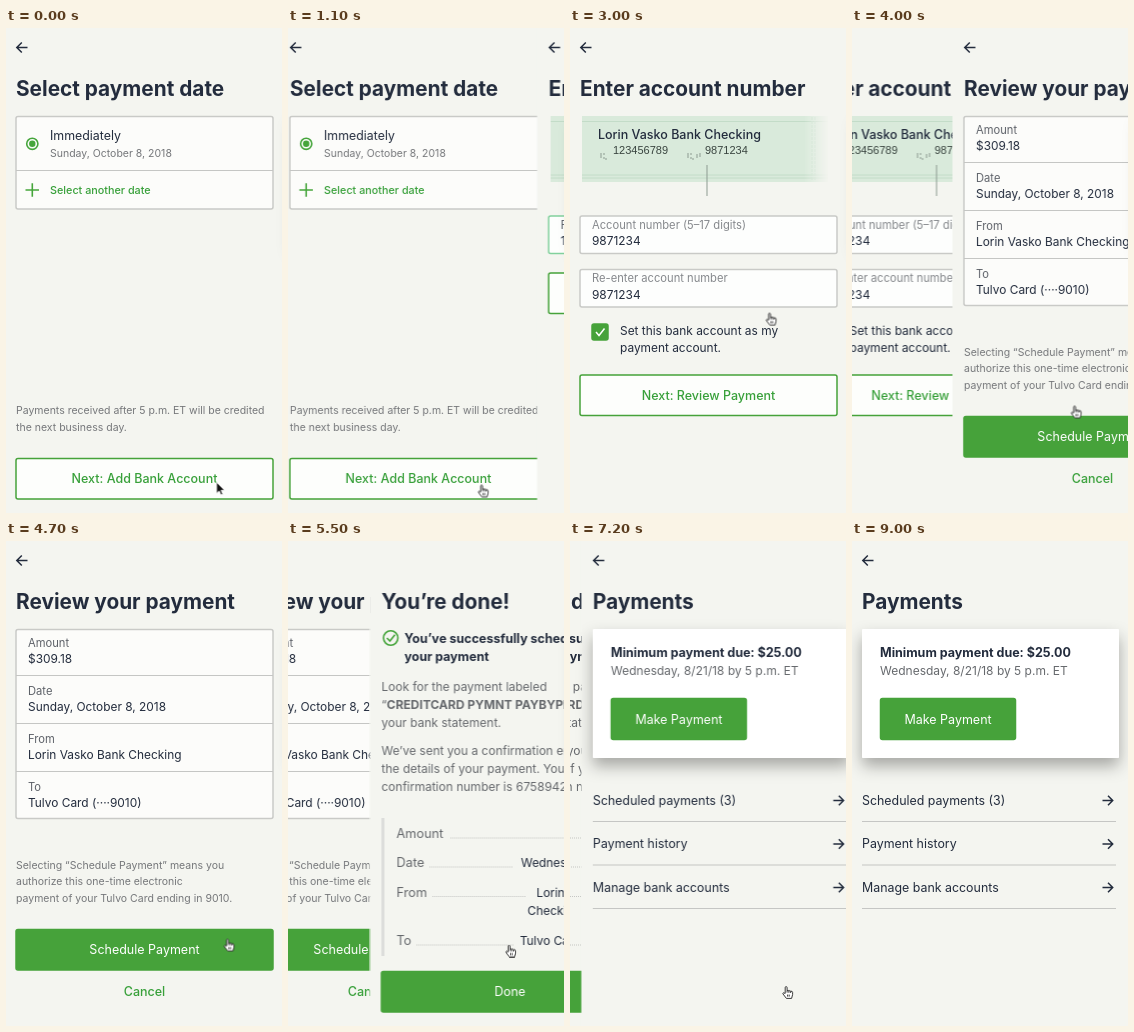
Animation, 276 px wide and 485 px high, one loop 9.1 s. Source, as an HTML page:

```html
<!DOCTYPE html>
<html lang="en">
<head>
<meta charset="utf-8">
<title>Payment flow</title>
<style>
  html, body { margin: 0; width: 100%; height: 100%; overflow: hidden; background: #f4f5f0; }
  svg { display: block; width: 100%; height: 100%; }
  text { font-family: Inter, "Open Sans", sans-serif; fill: #232c3d; white-space: pre; }
  .title { font-size: 20.8px; font-weight: 700; }
  .item { font-size: 12.4px; }
  .strong { font-size: 12.5px; font-weight: 700; }
  .copy { font-size: 12px; fill: #66696d; }
  .copy tspan { font-weight: 700; }
  .key { font-size: 12.8px; fill: #66696d; }
  .value { font-size: 11.9px; }
  .label { font-size: 11.2px; fill: #5d6168; }
  .pale { fill: #85888c; }
  .note { font-size: 10.5px; fill: #75777a; }
  .link { font-size: 10.8px; font-weight: 500; fill: #38a03a; }
  .bank { font-size: 12.5px; font-weight: 500; }
  .button { font-size: 12.5px; font-weight: 500; fill: #38a03a; }
  .light { fill: #fff; font-weight: 400; }
  .micr { font: 11px "Liberation Sans", Arial, sans-serif; fill: #39443f; }
  .faint { fill: #a3b0a6; }
  .right { text-anchor: end; }
  .middle { text-anchor: middle; }
  .help { font-size: 10.2px; fill: #6a7079; }
  .icon { fill: none; stroke: #232c3d; stroke-width: 1.5; }
  .go { fill: none; stroke: #45a53b; stroke-width: 1.6; }
  .tick { fill: none; stroke: #8d9b91; }
  .white { stroke: #fff; }
</style>
</head>
<body>
<svg viewBox="0 0 276 485" preserveAspectRatio="none">
  <defs>
    <linearGradient id="fade">
      <stop offset=".9" stop-color="#fff"/>
      <stop offset="1" stop-color="#fff" stop-opacity="0"/>
    </linearGradient>
    <mask id="torn"><rect x="11" y="80" width="248" height="80" fill="url(#fade)"/></mask>
    <filter id="lift" x="-15%" y="-15%" width="130%" height="150%">
      <feDropShadow dx="0" dy="8" stdDeviation="8" flood-color="#000" flood-opacity=".32"/>
    </filter>
  </defs>
  <g id="panes"></g>
  <g id="cursor">
    <path id="arrow" d="M0 0V11.5L2.7 9 4.5 13 6.4 12.2 4.7 8.3H8.2Z" fill="#111" stroke="#fff" stroke-width=".9"/>
    <path id="hand" d="M3.2 7.4V1.6Q3.2.6 4.1.6T5.1 1.6V4.6Q6.2 3.8 6.9 4.9 8 4.2 8.7 5.3 10.4 4.7 10.6 6.4V8.6L9.6 12.4H4.4L.8 7.7Q.7 6 3.2 7.4ZM5.1 4.6V6.6M6.9 5V6.8M8.7 5.4V7M5.6 8.6V10.6M7.2 8.6V10.6"
      fill="#fff" stroke="#222" stroke-width=".9" stroke-linejoin="round"/>
  </g>
</svg>
<script>
const LOOP = 9100, WIDTH = 276, SLIDE = 400;
const slideStarts = [1060, 2450, 3854, 5336, 6908];
const GREEN = '#46a23a', MINT = '#82d19d', GREY = '#c9cac7';

const text = (x, y, style, words) => `<text x="${x}" y="${y}" class="${style}">${words}</text>`;
const lines = (x, y, step, style, list) => list.map((words, i) => text(x, y + i * step, style, words)).join('');
const box = (y, height, fill, stroke, x = 10, width = 257) =>
  `<rect x="${x}" y="${y}" width="${width}" height="${height}" rx="2" fill="${fill}" stroke="${stroke}" stroke-width="1.5"/>`;
const path = (d, style = 'icon') => `<path d="${d}" class="${style}"/>`;
const rule = (y, x1 = 10, x2 = 267, extra = '') =>
  `<path d="M${x1} ${y}H${x2}" stroke="#c5c6c4" stroke-width="1.2" ${extra}/>`;
const title = words => text(10, 68, 'title', words);
const back = path('M21.5 19.5H11M15.8 14.5 10.8 19.5 15.8 24.5');
const outlineButton = (y, words) => box(y, 40.5, '#fdfefc', GREEN) + text(138.5, y + 24.7, 'button middle', words);
const solidButton = (y, words) => box(y, 40.5, GREEN, GREEN) + text(138.5, y + 24.7, 'button light middle', words);
const field = (y, label, value, border, tone = '') => box(y, 37.5, '#fdfefd', border)
  + text(22, y + 12.5, 'label ' + tone, label) + text(22, y + 29, 'value', value);

const symbol = x => path(`M${x} 125V130M${x + 3} 125V127M${x + 3} 129V131M${x + 5} 130V132`, 'tick');
const cheque = (bank, account, accountTone, pointer) => `<g mask="url(#torn)">
    <rect x="12" y="88" width="246" height="66" fill="#d9eadb"/>
    <path d="M12 93.5H258M12 147H258M12 150H258" stroke="#c3dcc8" fill="none"/>
    <path d="M242 89V153M245 89V153" stroke="#c9e0cd" stroke-dasharray="3 1"/>
  </g>`
  + symbol(31) + symbol(118) + path('M127 130V126M130 129V125', 'tick')
  + text(28, 110.5, 'bank', bank)
  + text(43, 126, 'micr', '123456789') + text(135, 126, 'micr ' + accountTone, account)
  + path(`M${pointer} 137V168`, 'tick');

const dateScreen = back + title('Select payment date')
  + box(88.5, 92.5, '#fcfcfa', GREY) + rule(142.5)
  + '<circle cx="26.3" cy="115.8" r="5.6" class="go"/><circle cx="26.3" cy="115.8" r="3.2" fill="#45a53b"/>'
  + path('M19.5 162H33M26.3 155.2V168.8', 'go')
  + text(44, 112, 'item', 'Immediately')
  + text(44, 128.5, 'note', 'Sunday, October 8, 2018')
  + text(44, 166, 'link', 'Select another date')
  + lines(10, 386, 16.5, 'note', ['Payments received after 5 p.m. ET will be credited', 'the next business day.'])
  + outlineButton(430.5, 'Next: Add Bank Account');

const routingScreen = back + title('Enter routing number')
  + cheque('Your Bank', '0000000000', 'faint', 46.5)
  + text(268, 174, 'help right', 'Need help?') + '<path d="M214 178.5H266" stroke="#6a7079"/>'
  + field(188, 'Routing number (9 digits)', '123456789', MINT)
  + outlineButton(245, 'Next: Account Number');

const accountScreen = back + title('Enter account number')
  + cheque('Lorin Vasko Bank Checking', '9871234', '', 137)
  + field(188, 'Account number (5–17 digits)', '9871234', GREY, 'pale')
  + field(241.5, 'Re-enter account number', '9871234', GREY, 'pale')
  + box(296, 16, GREEN, GREEN, 22, 16) + path('M26 304 29 307.5 34.5 300.5', 'icon white')
  + lines(50, 307, 16.5, 'value', ['Set this bank account as my', 'payment account.'])
  + outlineButton(347, 'Next: Review Payment');

const reviewRows = [['Amount', '$309.18'], ['Date', 'Sunday, October 8, 2018'],
  ['From', 'Lorin Vasko Bank Checking'], ['To', 'Tulvo Card (····9010)']];
const reviewScreen = back + title('Review your payment')
  + box(88.5, 189, '#fcfcfa', GREY)
  + reviewRows.map(([label, value], i) =>
      text(22, 106 + i * 48, 'label', label) + text(22, 122 + i * 48, 'value', value)
      + (i ? rule(86.5 + i * 48) : '')).join('')
  + lines(10, 328, 16.3, 'note', ['Selecting “Schedule Payment” means you',
      'authorize this one-time electronic', 'payment of your Tulvo Card ending in 9010.'])
  + solidButton(388.5, 'Schedule Payment')
  + text(138.5, 455, 'button middle', 'Cancel');

const dots = 'stroke-dasharray="1 1"';
const doneScreen = title('You’re done!')
  + '<circle cx="19.3" cy="97" r="7.2" class="go"/>' + path('M15.5 97 18.5 100 23.5 93.8', 'go')
  + lines(33, 101.5, 18, 'strong', ['You’ve successfully scheduled', 'your payment'])
  + lines(10, 149.5, 18, 'copy', ['Look for the payment labeled',
      '“<tspan>CREDITCARD PYMNT PAYBYPMT</tspan>” on', 'your bank statement.'])
  + lines(10, 214, 18, 'copy', ['We’ve sent you a confirmation email with',
      'the details of your payment. Your', 'confirmation number is 6758942.'])
  + '<rect x="10" y="277" width="3" height="138" fill="#dcdddb"/>'
  + [['Amount', 297, 79, 208, '$309.18'], ['Date', 326, 58, 142, 'Wednesday, 8/21/18'],
     ['From', 355.5, 61, 154, 'Lorin Vasko Bank'], ['To', 404, 45, 142, 'Tulvo Card (····9010)']]
    .map(([label, y, x1, x2, value]) =>
      text(25, y, 'key', label) + rule(y, x1, x2, dots) + text(262, y, 'value right', value)).join('')
  + text(262, 373.5, 'value right', 'Checking (····1234)')
  + solidButton(430.5, 'Done');

const paymentsScreen = back + title('Payments')
  + '<rect x="10" y="88" width="257" height="129" rx="1" fill="#fff" filter="url(#lift)"/>'
  + text(28, 116, 'strong', 'Minimum payment due: $25.00')
  + text(28, 134, 'copy', 'Wednesday, 8/21/18 by 5 p.m. ET')
  + box(157.5, 41, GREEN, GREEN, 28.5, 135) + text(96, 182.5, 'button light middle', 'Make Payment')
  + ['Scheduled payments (3)', 'Payment history', 'Manage bank accounts'].map((words, i) => {
      const y = 259.5 + i * 43.5;
      return text(10, y + 4, 'item', words) + path(`M250.5 ${y}H260.5M256 ${y - 4.7} 260.7 ${y} 256 ${y + 4.7}`)
        + rule(y + 21, 10, 264);
    }).join('');

const screens = [dateScreen, routingScreen, accountScreen, reviewScreen, doneScreen, paymentsScreen];
const panes = document.getElementById('panes');
panes.innerHTML = screens.map(content =>
  `<g><rect x="-1.5" width="280" height="485" fill="#f4f5f0"/>${content}</g>`).join('');

// Each row of steps is [time, properties, easing until the next row].
function play(node, steps) {
  const all = [[0, steps[0][1]], ...steps, [LOOP, steps[steps.length - 1][1]]];
  node.animate(all.map(([time, props, easing = 'linear']) => ({ offset: time / LOOP, easing, ...props })),
    { duration: LOOP, iterations: Infinity });
}
const at = (x, y = 0) => ({ transform: `translate(${x}px, ${y}px)` });

[...panes.children].forEach((pane, i) => {
  const enter = slideStarts[i - 1], leave = slideStarts[i], steps = [];
  if (enter) steps.push([enter, at(WIDTH + 2), 'ease'], [enter + SLIDE, at(0)]);
  if (leave) steps.push([leave, at(0), 'ease'], [leave + SLIDE, at(-WIDTH * .3)]);
  play(pane, steps);
});

const stops = [
  [0, 210.5, 454], [500, 189.5, 456.5],
  [1600, 189.5, 456.5], [2250, 192.5, 273],
  [2850, 192.5, 273], [3500, 218.5, 377.5],
  [4300, 218.5, 377.5], [4900, 217, 403.5],
  [5800, 217, 403.5], [6500, 212, 445]
];
play(document.getElementById('cursor'), stops.map(([time, x, y]) => [time, at(x, y), 'ease-in-out']));

const show = { opacity: 1 }, hide = { opacity: 0 };
play(document.getElementById('arrow'), [[250, show], [250, hide]]);
play(document.getElementById('hand'), [[250, hide], [250, show], [8000, show], [8500, hide]]);
</script>
</body>
</html>
```
